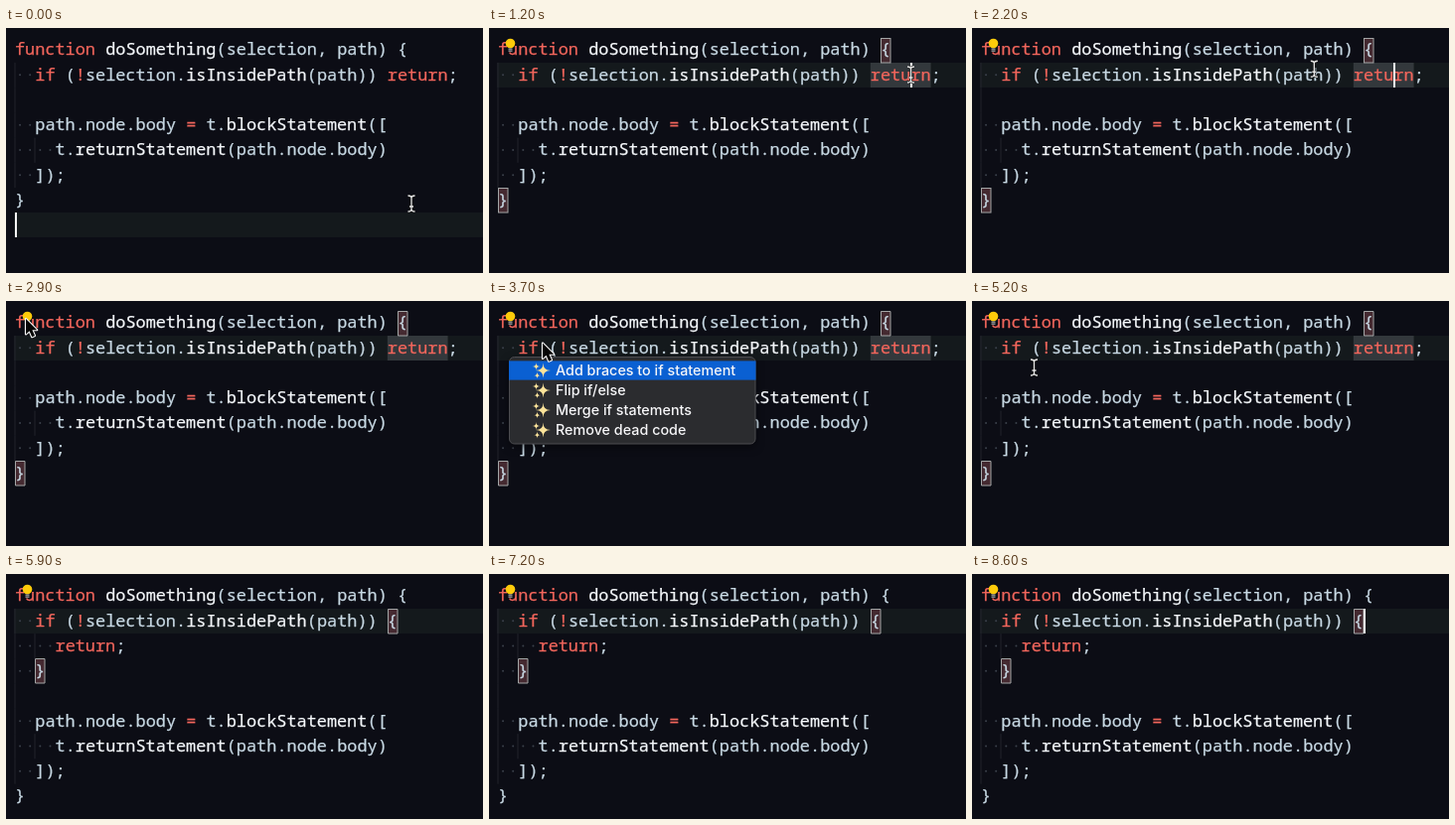
An HTML page with a canvas that plays this animation: 480 by 247 pixels, repeating every 8900 ms.

```html
<!DOCTYPE html>
<html lang="en">
<head>
<meta charset="utf-8">
<title>Editor quick fix</title>
<style>
  html, body { margin: 0; width: 100%; height: 100%; overflow: hidden; background: #0c0d15; }
  canvas { display: block; width: 480px; height: 247px; }
</style>
</head>
<body>
<canvas id="stage"></canvas>
<script>
const W = 480, H = 247, LOOP = 8900;
const X0 = 9, Y0 = 9.6, CH = 10.13, ROW = 25.25;
const CODE_FONT = '500 16.88px "Noto Sans Mono", "DejaVu Sans Mono", monospace';
const MENU_FONT = '500 14.35px Inter, Roboto, sans-serif';

const CLICK = 1000, MENU_OPEN = 3300, MENU_CLOSE = 5200, EDIT = 5400;

const head = 'function doSomething(selection, path) {';
const test = '  if (!selection.isInsidePath(path)) ';
const tail = ['', '  path.node.body = t.blockStatement([',
  '    t.returnStatement(path.node.body)', '  ]);', '}'];
const before = [head, test + 'return;', ...tail];
const after = [head, test + '{', '    return;', '  }', ...tail];
const items = ['Add braces to if statement', 'Flip if/else',
  'Merge if statements', 'Remove dead code'];

// time, x, y
const path = [
  [0, 408, 177], [300, 408, 177], [900, 424.5, 47], [2000, 424.5, 47],
  [2700, 20, 18], [3300, 20, 18], [3600, 54, 42.5], [3800, 54, 42.5], [4400, 62.5, 67]
];

const canvas = document.getElementById('stage');
const dpr = window.devicePixelRatio || 1;
canvas.width = W * dpr;
canvas.height = H * dpr;
const ctx = canvas.getContext('2d');

const colX = c => X0 + c * CH;
const rowY = r => Y0 + r * ROW;

function rect(x, y, w, h, color) {
  ctx.fillStyle = color;
  ctx.fillRect(x, y, w, h);
}

function disc(x, y, r, color) {
  ctx.fillStyle = color;
  ctx.beginPath();
  ctx.arc(x, y, r, 0, Math.PI * 2);
  ctx.fill();
}

function pointerAt(t) {
  const i = path.findIndex(p => p[0] > t);
  if (i < 0) return path[path.length - 1].slice(1);
  const [t0, x0, y0] = path[i - 1], [t1, x1, y1] = path[i];
  const u = (t - t0) / (t1 - t0), e = u * u * (3 - 2 * u);
  return [x0 + (x1 - x0) * e, y0 + (y1 - y0) * e];
}

function drawLine(line, r) {
  const indent = line.search(/\S|$/);
  for (let c = 0; c < indent; c++) disc(colX(c + 0.5), rowY(r) + 12.5, 1, '#3b414b');
  for (let c = 0; c < indent; c += 2) rect(Math.round(colX(c)) - 0.5, rowY(r), 1, ROW, '#22252d');
  ctx.font = CODE_FONT;
  ctx.lineWidth = 0.25;
  for (const m of line.matchAll(/\w+|[^\w\s]/g)) {
    const word = m[0], next = line[m.index + word.length];
    const keyword = /^(function|if|return|!|=)$/.test(word);
    const call = /^\w/.test(word) && next === '(';
    const x = colX(m.index), y = rowY(r) + 17.7;
    ctx.fillStyle = ctx.strokeStyle = keyword ? '#f2665c' : call ? '#f4f7fa' : '#c8d9e4';
    ctx.fillText(word, x, y);
    ctx.strokeText(word, x, y);
  }
}

function braceBox(c, r) {
  const x = Math.round(colX(c)), y = Math.round(rowY(r));
  rect(x, y, 10, 25, '#452a31');
  ctx.strokeStyle = '#a3a6a6';
  ctx.lineWidth = 1;
  ctx.strokeRect(x + 0.5, y + 0.5, 9.5, 24.5);
}

function caret(c, r) {
  rect(Math.round(colX(c)), Math.round(rowY(r)), 2, 25, '#f4f4f4');
}

function bulb() {
  rect(18.5, 18, 6, 6.5, '#0c0d15');
  rect(19.5, 20.5, 4, 1.2, '#b5b5b5');
  rect(19.5, 22.5, 4, 1.2, '#b5b5b5');
  disc(21.5, 15.5, 4.8, '#ffcb0a');
}

function star(x, y, r) {
  ctx.fillStyle = '#fbe39a';
  ctx.beginPath();
  ctx.moveTo(x, y - r);
  for (let i = 1; i <= 4; i++) {
    const a = i * Math.PI / 2;
    ctx.quadraticCurveTo(x, y, x + Math.sin(a) * r, y - Math.cos(a) * r);
  }
  ctx.fill();
}

function menu() {
  ctx.save();
  ctx.shadowColor = 'rgba(0,0,0,.5)';
  ctx.shadowBlur = 8;
  ctx.shadowOffsetY = 3;
  ctx.fillStyle = '#2b2c2f';
  ctx.beginPath();
  ctx.roundRect(20.5, 56.5, 247.5, 87.5, 5);
  ctx.fill();
  ctx.restore();
  ctx.strokeStyle = '#4c4c50';
  ctx.lineWidth = 1;
  ctx.stroke();
  rect(20, 60.4, 248.5, 19.2, '#0a60d2');
  ctx.font = MENU_FONT;
  items.forEach((label, i) => {
    const y = 70 + i * 20;
    star(54.5, y, 7.5);
    star(47.5, y - 4, 4);
    star(48.5, y + 5, 3.6);
    ctx.fillStyle = '#f6f6f8';
    ctx.fillText(label, 67, y + 5);
  });
}

function arrow(x, y) {
  const pts = [[0, 0], [0, 15.5], [3.6, 12.2], [6.2, 18.2], [9, 17], [6.4, 11.2], [11.2, 11.2]];
  ctx.beginPath();
  pts.forEach(p => ctx.lineTo(x + p[0], y + p[1]));
  ctx.closePath();
  ctx.lineJoin = 'round';
  ctx.strokeStyle = '#f5f5f5';
  ctx.lineWidth = 2.2;
  ctx.stroke();
  ctx.fillStyle = '#050505';
  ctx.fill();
}

function iBeam(x, y) {
  ctx.beginPath();
  for (const s of [-1, 1]) {
    ctx.moveTo(x - 3.5, y + s * 8);
    ctx.quadraticCurveTo(x, y + s * 8, x, y + s * 5.5);
    ctx.quadraticCurveTo(x, y + s * 8, x + 3.5, y + s * 8);
  }
  ctx.moveTo(x, y - 6);
  ctx.lineTo(x, y + 6);
  ctx.moveTo(x - 2, y + 3);
  ctx.lineTo(x + 2, y + 3);
  ctx.strokeStyle = '#101010';
  ctx.lineWidth = 2.6;
  ctx.stroke();
  ctx.strokeStyle = '#e6e6e6';
  ctx.lineWidth = 1.3;
  ctx.stroke();
}

function caretOn(t) {
  if (t < CLICK) return t < 500;
  if (t < EDIT) return t < MENU_OPEN && t % 1000 < 500;
  const phase = t % 1000;
  return t < 5900 || (phase >= 300 && phase < 900);
}

function draw(t) {
  const clicked = t >= CLICK, edited = t >= EDIT;
  const open = t >= MENU_OPEN && t < MENU_CLOSE;
  const row = clicked ? 1 : 7;

  ctx.setTransform(dpr, 0, 0, dpr, 0, 0);
  rect(0, 0, W, H, '#0c0d15');
  rect(8, Math.round(rowY(row)), W - 8, 25, '#14191c');

  if (edited) {
    braceBox(37, 1);
    braceBox(2, 3);
  } else if (clicked) {
    rect(colX(37), 35, CH * 6, 25, '#33383c');
    braceBox(38, 0);
    braceBox(0, 6);
  }

  const lines = edited ? after : before;
  const gap = edited ? 4 : 2;
  rect(8.5, rowY(gap), 1, ROW, '#22252d');
  lines.forEach(drawLine);

  if (clicked) bulb();
  if (caretOn(t)) caret(edited ? 38 : clicked ? 41 : 0, row);
  if (open) menu();
  if (!edited) {
    const [x, y] = pointerAt(t);
    (open || x < 35 ? arrow : iBeam)(x, y);
  }
}

function tick(ms) {
  const n = Math.floor(ms / 100);
  return (n % 10 === 1 ? n - 1 : n) * 100;
}

const start = performance.now();
function loop() {
  draw(tick((performance.now() - start) % LOOP));
  requestAnimationFrame(loop);
}
loop();
</script>
</body>
</html>
```
